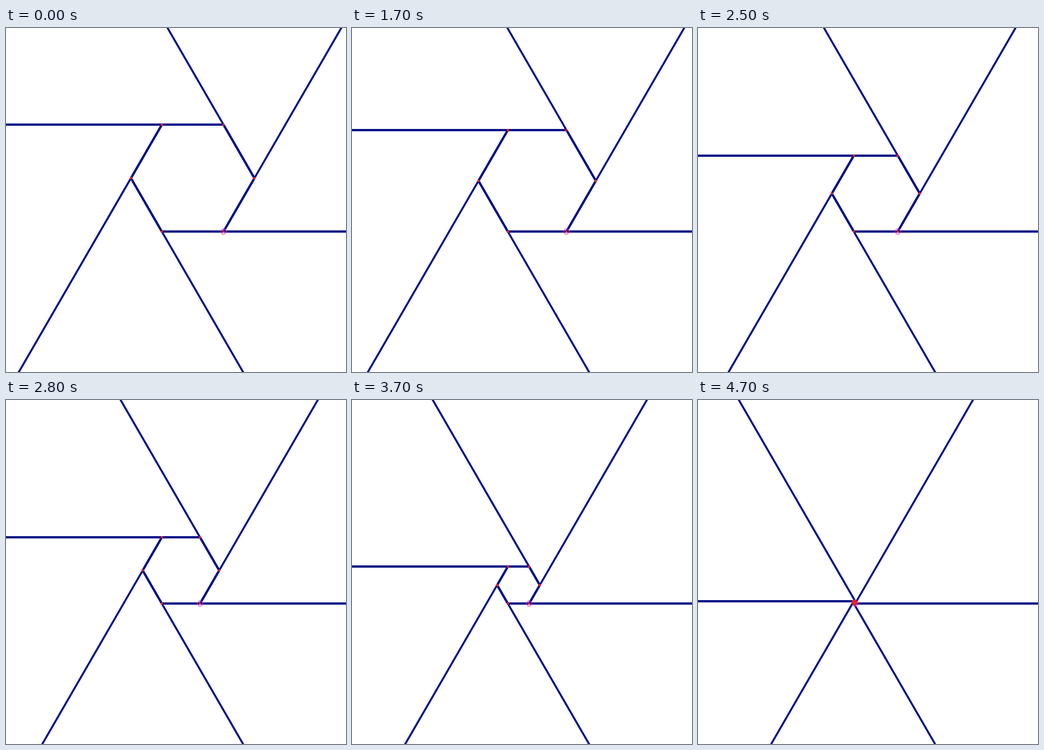
An HTML page with a canvas that plays this animation: 743 px wide and 753 px high, repeating every 8700 ms.

```html
<!DOCTYPE html>
<html lang="en">
<head>
<meta charset="utf-8">
<title>Closing hexagon</title>
<style>
  html, body { margin: 0; width: 100%; height: 100%; overflow: hidden; background: #fff; }
  canvas { display: block; }
</style>
</head>
<body>
<canvas id="stage" width="743" height="753"></canvas>
<script>
const ctx = document.getElementById('stage').getContext('2d');
const LOOP = 8700, STEP = 100, END = 4700;
const NAVY = '#001087', RED = '#f01c24', PINK = '#e035d5';
const ORIGIN = { x: 340.5, y: 445.5 };
const RISE = Math.sqrt(3) / 2;

// Hexagon side length over time: [ms, px]
const SIDES = [[1700, 128.2], [2100, 112.5], [2200, 108.5], [2800, 83.6],
  [3000, 75.3], [3700, 46.6], [3900, 37.8], [4300, 20.3], [END, 3]];

function sideAt(ms) {
  if (ms <= 1200) return 134.9;
  if (ms <= 1700) return 134.9 - 6.7 * ((ms - 1200) / 500) ** 2;
  for (let i = 1; i < SIDES.length; i++) {
    const [t0, s0] = SIDES[i - 1], [t1, s1] = SIDES[i];
    if (ms <= t1) return s0 + (s1 - s0) * (ms - t0) / (t1 - t0);
  }
  return SIDES[SIDES.length - 1][1];
}

// Vertices counterclockwise from the fixed lower left corner
function hexagon(side) {
  const h = side * RISE;
  return [[0, 0], [side, 0], [side * 1.5, h], [side, 2 * h], [0, 2 * h], [-side / 2, h]]
    .map(([x, y]) => ({ x: ORIGIN.x + x, y: ORIGIN.y - y }));
}

function line(a, b, width) {
  const flat = Math.abs(a.y - b.y) < 0.01;
  const snap = y => flat ? Math.floor(y) + 0.5 : y;
  ctx.lineWidth = flat ? 5 : width;
  ctx.beginPath();
  ctx.moveTo(a.x, snap(a.y));
  ctx.lineTo(b.x, snap(b.y));
  ctx.stroke();
}

function ray(from, index) {
  const angle = index * Math.PI / 3;
  const to = { x: from.x + 1200 * Math.cos(angle), y: from.y - 1200 * Math.sin(angle) };
  line(from, to, 4.3);
}

function circle(p, r) {
  ctx.beginPath();
  ctx.arc(p.x, p.y, r, 0, 2 * Math.PI);
}

function draw(ms) {
  const side = sideAt(ms);
  const points = hexagon(side);
  const closed = ms >= END;

  ctx.fillStyle = '#fff';
  ctx.fillRect(0, 0, 743, 753);
  ctx.strokeStyle = NAVY;
  points.forEach((p, i) => {
    ray(p, i);
    line(p, points[(i + 1) % 6], 5);
  });

  ctx.strokeStyle = PINK;
  ctx.lineWidth = 1.4;
  circle(points[1], 5.8);
  ctx.stroke();

  ctx.fillStyle = RED;
  if (closed) {
    circle({ x: ORIGIN.x + side / 2, y: ORIGIN.y - side * RISE }, 6.4);
    ctx.fill();
  } else {
    for (const p of points) {
      circle(p, 2.6);
      ctx.fill();
    }
  }
}

const start = performance.now();
function tick() {
  const ms = (performance.now() - start) % LOOP;
  draw(Math.floor(ms / STEP) * STEP);
  requestAnimationFrame(tick);
}
tick();
</script>
</body>
</html>
```
